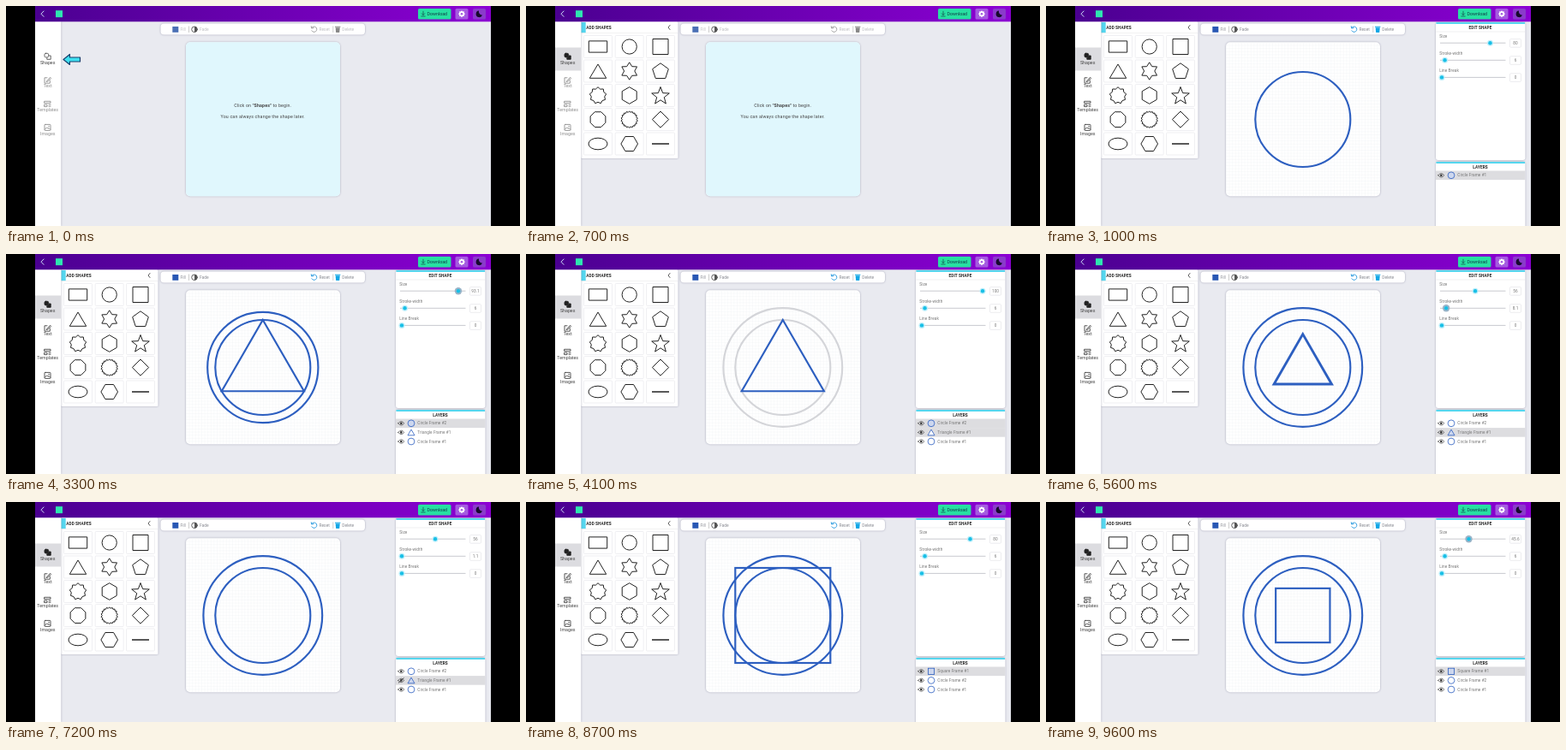
An HTML page that plays this animation: 600 by 257 pixels, repeating every 10 s.

```html
<!DOCTYPE html>
<html lang="en">
<head>
<meta charset="utf-8">
<title>Shape editor</title>
<style>
html, body { margin: 0; width: 100%; height: 100%; overflow: hidden; background: #000; }
svg { display: block; width: 600px; height: 257px; }
text { font-family: Roboto, sans-serif; font-size: 5.3px; fill: #444; }
.mid { text-anchor: middle; }
.title { font-size: 4.7px; font-weight: 700; letter-spacing: .1px; fill: #222; }
.small { font-size: 4.7px; fill: #777; letter-spacing: .08px; }
.tool { font-size: 4.9px; fill: #85878f; }
.line { fill: none; stroke: #444; stroke-width: .9; stroke-linejoin: round; stroke-linecap: round; }
.ink { fill: none; stroke: #222; stroke-width: 1; }
.card { fill: #fff; filter: drop-shadow(0 .8px 1.2px rgba(40, 40, 80, .35)); }
</style>
</head>
<body>
<svg viewBox="0 0 600 257">
  <defs>
    <linearGradient id="bar"><stop stop-color="#4b0091"/><stop offset="1" stop-color="#8c00d3"/></linearGradient>
    <pattern id="grid" x="210" y="42" width="3.6" height="3.6" patternUnits="userSpaceOnUse">
      <path d="M0 0H3.6M0 0V3.6" stroke="#f0f1f4" stroke-width=".7"/>
    </pattern>
    <clipPath id="stage"><rect x="34" width="532" height="257"/></clipPath>
    <clipPath id="work"><rect x="64" y="18" width="502" height="239"/></clipPath>
  </defs>
  <rect width="600" height="257"/>
  <g clip-path="url(#stage)">
    <rect x="34" width="532" height="257" fill="#e9eaf0"/>
    <g id="toolbar"></g>
    <g id="canvas"></g>
    <g id="props"></g>
    <g id="layers"></g>
    <g clip-path="url(#work)"><g id="picker"></g></g>
    <rect x="34" y="18" width="30.3" height="239" class="card"/>
    <g id="side"></g>
    <g id="header"></g>
  </g>
</svg>
<script>
const $ = id => document.getElementById(id);
const put = (id, html) => { $(id).innerHTML = html; };
const LOOP = 10000, STEP = 100;
const CX = 299.8, CY = 132.5, UNIT = .694, PEN = .36;
const BLUE = '#2d5fc0', CYAN = '#55d6ee';

const text = (x, y, s, cls = '', extra = '') => `<text x="${x}" y="${y}" class="${cls}" ${extra}>${s}</text>`;
const rect = (x, y, w, h, extra = '') => `<rect x="${x}" y="${y}" width="${w}" height="${h}" ${extra}/>`;
const circle = (x, y, r, extra = '') => `<circle cx="${x}" cy="${y}" r="${r}" ${extra}/>`;
const path = (d, extra = '') => `<path d="${d}" ${extra}/>`;

// Polygon or, with an inner ratio below 1, a star.
function poly(x, y, r, n, inner = 1, turn = -90) {
  const m = inner < 1 ? n * 2 : n;
  const pts = Array.from({ length: m }, (_, i) => {
    const a = (turn + i * 360 / m) * Math.PI / 180;
    const q = i % 2 ? r * inner : r;
    return (x + q * Math.cos(a)).toFixed(2) + ' ' + (y + q * Math.sin(a)).toFixed(2);
  });
  return 'M' + pts.join('L') + 'Z';
}

// Linear path through [time, value] pairs.
function track(t, keys) {
  if (t <= keys[0][0]) return keys[0][1];
  for (let i = 1; i < keys.length; i++) {
    const [a, u] = keys[i - 1], [b, v] = keys[i];
    if (t <= b) return u + (v - u) * (t - a) / (b - a);
  }
  return keys[keys.length - 1][1];
}

function buildHeader() {
  const gear = poly(532, 9.2, 4, 8, .75);
  put('header',
    rect(34, 0, 532, 18.3, 'fill="url(#bar)"') +
    path('M44 6L41 9.2L44 12.4', 'class="line" style="stroke:#d9f4ff"') +
    rect(58, 5.2, 8, 8, 'fill="#2ee6b0"') +
    rect(481, 3, 38.5, 12.6, 'rx="1.6" fill="#27e0a2"') +
    path('M487 6.3V10.3M485.3 8.8L487 10.5L488.7 8.8M484.8 12H489.2', 'class="line" style="stroke:#16404a;stroke-width:.7"') +
    text(491.5, 11, 'Download', '', 'style="fill:#123d48"') +
    rect(524.5, 3, 15, 12.6, 'rx="1.6" fill="#a45be0"') +
    path(gear, 'fill="#fff"') + circle(532, 9.2, 1.3, 'fill="#a45be0"') +
    rect(545, 3, 15, 12.6, 'rx="1.6" fill="#8a3bcb"') +
    path('M552 5.6A3.8 3.8 0 1 0 556 10.6A4 4 0 0 1 552 5.6Z', 'fill="#160a2c"'));
}

function buildPicker() {
  const cols = [84, 120.7, 157], rows = [47.5, 76, 104.5, 132.6, 161];
  const shapes = [
    (x, y) => `M${x - 10.7} ${y - 6.6}h21.4v13.2h-21.4Z`,
    (x, y) => `M${x - 8.6} ${y}a8.6 8.6 0 1 0 17.2 0a8.6 8.6 0 1 0 -17.2 0Z`,
    (x, y) => `M${x - 9} ${y - 9}h18v18h-18Z`,
    (x, y) => `M${x} ${y - 8}l9.7 16.3h-19.4Z`,
    (x, y) => poly(x, y, 10.2, 6, .6),
    (x, y) => poly(x, y + .6, 9.8, 5),
    (x, y) => poly(x, y, 9.8, 9, .8),
    (x, y) => poly(x, y, 9.8, 6),
    (x, y) => poly(x, y + .8, 10.8, 5, .42),
    (x, y) => poly(x, y, 9.6, 8, 1, 22.5),
    (x, y) => poly(x, y, 9.8, 18, .86),
    (x, y) => poly(x, y, 9.6, 4),
    (x, y) => `M${x - 11} ${y}a11 6.8 0 1 0 22 0a11 6.8 0 1 0 -22 0Z`,
    (x, y) => poly(x, y, 9.8, 6, 1, 0),
    (x, y) => `M${x - 10} ${y}h20`
  ];
  let out = rect(64, 18, 113.5, 160, 'rx="1.5" class="card"') +
    rect(64.3, 19, 5.4, 12.3, `fill="${CYAN}"`) +
    text(70.3, 27, 'ADD SHAPES', 'title') +
    path('M168 22.5L166 25L168 27.5', 'class="line"') +
    path('M64.3 31.6H177', 'stroke="#e6e6ea" stroke-width=".6"');
  shapes.forEach((f, i) => {
    const x = cols[i % 3], y = rows[i / 3 | 0];
    out += rect(x - 16.5, y - 13, 33, 26, 'rx="1" fill="#fff" stroke="#e8e8ec" stroke-width=".7"') +
      path(f(x, y), `class="ink" ${i === 14 ? 'style="stroke-width:1.5"' : ''}`);
  });
  put('picker', out);
}

function drawToolbar(on) {
  const dim = on ? 1 : .55, a = on ? '#2196dd' : '#999', b = on ? '#12a7e6' : '#888';
  const rule = x => path(`M${x} 23.5V31`, 'stroke="#aaa" stroke-width=".6"');
  put('toolbar', rect(180.5, 20.5, 238.5, 13, 'rx="4" class="card"') +
    rect(194.3, 24, 7, 6.8, `fill="${on ? '#2857b4' : '#4a6fb5'}"`) +
    rule(213.5) + circle(220, 27.3, 3.3, 'class="line" style="stroke:#555"') +
    path('M220 24A3.3 3.3 0 0 1 220 30.6Z', 'fill="#555"') +
    path('M357 25.3A3.2 3.2 0 1 1 356.8 28.8M356.3 23.8L356.7 26L359 25.7', `class="line" style="stroke:${a}"`) +
    rule(381.8) + path('M384.6 25.2H389.8L389.2 30.9H385.2ZM384 23.8H390.4V24.7H384Z', `fill="${b}"`) +
    `<g opacity="${dim}">` + text(203.5, 29, 'Fill', 'tool') + text(226, 29, 'Fade', 'tool') +
    text(365.5, 29, 'Reset', 'tool') + text(392.3, 29, 'Delete', 'tool') + '</g>');
}

function drawSide(t) {
  const open = t >= 300, on = t >= 1000;
  const ink = open ? '#222' : '#555';
  const icons = [
    rect(45, 55.3, 4.6, 4.6, `rx="1.4" class="line" style="stroke:${ink};fill:${open ? ink : 'none'}"`) +
      path('M50.3 58H52.2V62.3H47.8V60.7', `class="line" style="stroke:${ink};fill:${open ? ink : 'none'}"`),
    path('M48 83.8H45V90.2H51.3V87M47.6 87.8L51.6 83.3L52.6 84.3L48.6 88.2L47.4 88.4Z', 'class="line"'),
    rect(45, 111.3, 7, 2.1, 'class="line"') + rect(45, 115.2, 3, 2.4, 'class="line"') + path('M50 115.4H52M50 117.3H52', 'class="line"'),
    rect(45, 138.4, 7, 7, 'rx=".8" class="line"') + path('M45.4 144.2L47.6 141.8L49 143.3L50 142.4L51.7 144.2', 'class="line"') + circle(50, 140.5, .7, 'fill="#444"')
  ];
  let out = open ? rect(34, 48.5, 30, 27, 'fill="#dcdce0"') : '';
  ['Shapes', 'Text', 'Templates', 'Images'].forEach((name, i) => {
    out += `<g opacity="${on || i === 0 ? 1 : .6}">` + icons[i] + text(48.7, 67.6 + i * 27.7, name, 'mid') + '</g>';
  });
  if (t < 300) {
    const dx = [0, 2, 1][t / STEP];
    out += path('M67 62.5L74.4 56.5V60H86.5V65H74.4V68.5Z',
      `transform="translate(${dx})" fill="#3fe0f0" stroke="#18406e" stroke-width="1.2" stroke-linejoin="round"`);
  }
  put('side', out);
}

function outline(s) {
  const r = s.size * UNIT;
  let color = s.faded ? (s.faded < 1 ? '#93a9d4' : '#d4d5d9') : BLUE;
  const pen = `fill="none" stroke="${color}" stroke-width="${(s.pen * PEN).toFixed(2)}"` +
    (s.gap > .05 ? ` stroke-dasharray="${(s.gap * PEN).toFixed(2)}"` : '');
  if (s.kind === 'Circle') return circle(CX, CY, r, pen);
  if (s.kind === 'Square') return rect(CX - r, CY - r, r * 2, r * 2, pen);
  return path(poly(CX, CY, r, 3), pen);
}

function drawCanvas(t, list) {
  let out = rect(210, 42.3, 180, 180, 'rx="5" class="card"');
  if (t < 1000) {
    out += rect(210, 42.3, 180, 180, 'rx="5" fill="#e0f7fd"') +
      text(299.7, 118, 'Click on <tspan font-weight="700">"Shapes"</tspan> to begin.', 'mid', 'letter-spacing=".16"') +
      text(299.7, 130.5, 'You can always change the shape later.', 'mid', 'letter-spacing=".16"');
  } else {
    out += rect(210, 42.3, 180, 180, 'rx="5" fill="url(#grid)"') +
      list.filter(s => !s.hidden).map(outline).join('');
  }
  put('canvas', out);
}

function panel(y, h, title) {
  return rect(455, y, 104.5, h, 'rx="3" class="card"') +
    path(`M455.5 ${y + 1}H559`, `stroke="${CYAN}" stroke-width="2"`) +
    text(507, y + 7.7, title, 'title mid');
}

function drawProps(t, s) {
  if (t < 1000) return put('props', '');
  const grab = (a, b) => t >= a && t <= b;
  const rows = [
    ['Size', s.size, 460.4 + s.size * .726, grab(3000, 3700) || grab(4700, 5200) || grab(9200, 9900)],
    ['Stroke-width', s.pen, 461.2 + s.pen * .73, grab(5300, 5900)],
    ['Line Break', s.gap, 462 + s.gap * .73, grab(6100, 7000)]
  ];
  let out = panel(19, 161, 'EDIT SHAPE') + path('M455 30H559.5', 'stroke="#e4e4e8" stroke-width=".6"');
  rows.forEach(([name, value, x, held], i) => {
    const y = 43.2 + i * 20.1;
    out += text(459.3, y - 6.5, name, 'small') +
      path(`M460 ${y}H536.5`, 'stroke="#c9cacf" stroke-width="1"') +
      circle(x, y, held ? 4.2 : 3.5, `fill="${held ? '#9ab4c8' : '#bdeefa'}"`) +
      circle(x, y, 2.2, 'fill="#19bfe6"') +
      rect(541.5, y - 4.6, 13, 9.6, 'rx="1" fill="#fff" stroke="#dfdfe4" stroke-width=".6"') +
      text(548, y + 1.9, +value.toFixed(1), 'small mid');
  });
  put('props', out);
}

function drawLayers(t, list) {
  if (t < 1000) return put('layers', '');
  let out = panel(182, 80, 'LAYERS');
  [...list].reverse().forEach((s, i) => {
    const y = 197.8 + i * 10.6;
    const pen = `fill="${s.on ? '#cdd7ee' : '#fff'}" stroke="${BLUE}" stroke-width=".8"`;
    if (s.on || s.hover) out += rect(455, y - 5.3, 104.5, 10.6, 'fill="#dddde0"');
    out += path(`M457.8 ${y}Q461.3 ${y - 4.6} 464.8 ${y}Q461.3 ${y + 4.6} 457.8 ${y}Z`, 'class="line" style="stroke-width:.7"') +
      circle(461.3, y, 1.3, 'fill="#333"');
    if (s.hidden) out += path(`M458.3 ${y + 2.7}L464.3 ${y - 2.7}`, 'class="line"');
    if (s.kind === 'Circle') out += circle(473, y, 3.9, pen);
    else if (s.kind === 'Square') out += rect(469.4, y - 3.6, 7.2, 7.2, pen);
    else out += path(`M473 ${y - 3.4}L477 ${y + 3.4}H469Z`, pen);
    out += text(480.3, y + 1.6, `${s.kind} Frame #${s.no}`, 'small');
  });
  put('layers', out);
}

function shapesAt(t) {
  const list = [];
  const add = (kind, no, size, pen = 6, gap = 0) => {
    const s = { kind, no, size, pen, gap };
    list.push(s);
    return s;
  };
  if (t < 1000) return list;
  const fade = t >= 3900 && t < 4400 ? (t < 4000 ? .5 : 1) : 0;
  const one = add('Circle', 1, 80);
  one.faded = fade;
  one.on = t < 2000;
  if (t >= 2000 && t < 8400) {
    const tri = add('Triangle', 1,
      track(t, [[4600, 80], [5100, 56]]),
      track(t, [[5200, 6], [5400, 16], [5500, 15], [5600, 8.1], [5700, 1.5], [5800, 1.1]]),
      track(t, [[6000, 0], [6400, 30], [6500, 30], [6900, 0]]));
    tri.on = t < 2600 || t >= 4200;
    tri.hover = t >= 3900;
    tri.hidden = t >= 7200 && t < 7500 || t >= 7700 && t < 7900;
  }
  if (t >= 2600) {
    const two = add('Circle', 2, track(t, [[2900, 80], [3000, 82], [3300, 93.1], [3600, 100]]));
    two.faded = fade;
    two.on = t < 4200;
  }
  if (t >= 8700) add('Square', 1, track(t, [[9100, 80], [9200, 87], [9300, 80], [9600, 45.6]])).on = true;
  return list;
}

function draw(t) {
  const list = shapesAt(t);
  const current = list.find(s => s.on) || { size: 80, pen: 6, gap: 0 };
  drawToolbar(t >= 1000);
  drawSide(t);
  drawCanvas(t, list);
  drawProps(t, current);
  drawLayers(t, list);
  $('picker').setAttribute('transform', `translate(${track(t, [[200, -120], [700, 0]])})`);
}

buildHeader();
buildPicker();
const start = performance.now();
let last = -1;
function tick() {
  const t = Math.floor((performance.now() - start) % LOOP / STEP) * STEP;
  if (t !== last) draw(last = t);
  requestAnimationFrame(tick);
}
tick();
</script>
</body>
</html>
```
